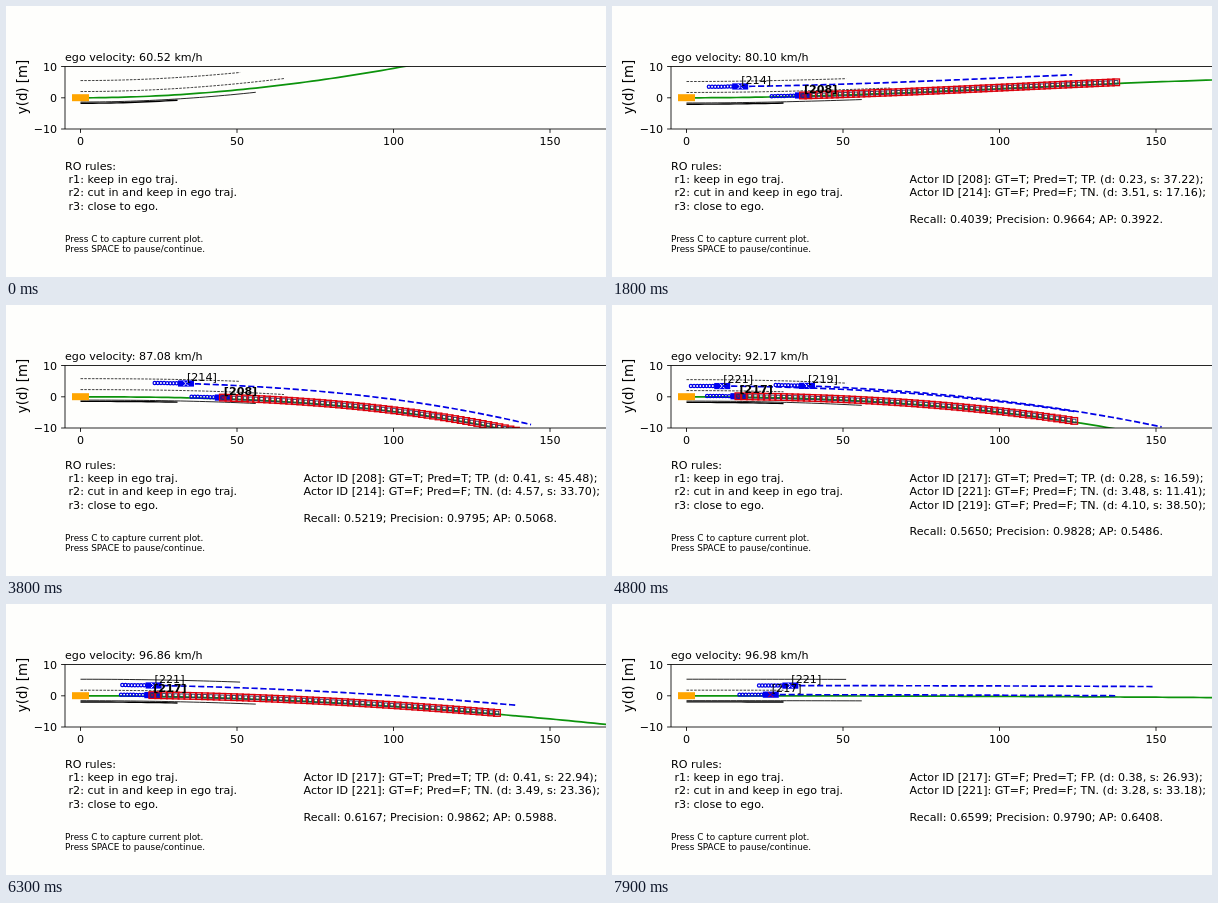
These frames come from a looping animation (600x271 px, 8 s). An HTML page:

```html
<!DOCTYPE html>
<html>
<head>
<meta charset="utf-8">
<style>
  html, body { margin: 0; width: 100%; height: 100%; overflow: hidden; background: #fefefc; }
  svg { display: block; width: 100vw; height: 100vh; }
  text { font: 11.11px "DejaVu Sans", sans-serif; fill: #000; }
  .axis { font-size: 13.33px; }
  .hint { font-size: 8.89px; }
  .bold { font-weight: bold; }
  .line { fill: none; stroke: #000; stroke-width: .85; }
  .thick { stroke-width: 1.4; }
  .dash { stroke-dasharray: 2.6 1.2; stroke-width: .75; }
  .ego { stroke: #0c930c; stroke-width: 1.7; }
  .pred { stroke: #0000e6; stroke-width: 1.67; stroke-dasharray: 6.2 2.7; }
  .trail { fill: none; stroke: #0000e6; stroke-width: 1.25; }
  .box { fill: none; stroke: #dc000c; stroke-width: 1.35; }
  .core { fill: none; stroke: #2c3358; stroke-width: .9; }
</style>
</head>
<body>
<svg viewBox="0 0 600 271">
  <defs><clipPath id="plot"><rect x="59" y="60.5" width="541" height="62.5"/></clipPath></defs>
  <g id="data" clip-path="url(#plot)"></g>
  <g id="axes"></g>
  <g id="labels"></g>
  <text class="axis" text-anchor="middle" transform="translate(20.5 81) rotate(-90)">y(d) [m]</text>
  <text x="59" y="163.5">RO rules:</text>
  <text x="62.5" y="177">r1: keep in ego traj.</text>
  <text x="62.5" y="190.3">r2: cut in and keep in ego traj.</text>
  <text x="62.5" y="203.6">r3: close to ego.</text>
  <text class="hint" x="59" y="236">Press C to capture current plot.</text>
  <text class="hint" x="59" y="246">Press SPACE to pause/continue.</text>
</svg>
<script>
const STEP = 100, STEPS = 80, SWITCH = 48, LOST = 75;
const el = id => document.getElementById(id);
const px = x => 74.5 + x * 3.13;
const py = y => 91.8 - y * 3.13;
const mix = (a, b, u) => a + (b - a) * u;
const range = count => Array.from({ length: count }, (_, i) => i);

// step, speed, road bend and twist, sideways drift of the lanes
const drive = [
  [0, 60.52, 10.6, -1.2, .1],
  [18, 80.10, 4.2, -1.3, -.2],
  [29, 84.15, 7.9, -5.6, .1],
  [38, 87.08, -1.9, -2.8, .4],
  [57, 96.75, -5.2, 0, -.2],
  [70, 96.98, -1.8, .5, 0],
  [79, 96.98, -.2, 0, -.1]
];

// poses: step, s, d
const actors = [
  { id: 208, from: 1, to: SWITCH, hit: true, poses: [[18, 37.22, .23], [29, 43.6, .35], [38, 45.48, .41]] },
  { id: 214, from: 1, to: SWITCH, poses: [[18, 17.16, 3.51], [29, 28.17, 4.4], [38, 33.7, 4.57]] },
  { id: 217, from: SWITCH, to: STEPS, hit: true, poses: [[57, 20.4, .36], [70, 25.91, .47], [79, 26.93, .38]] },
  { id: 221, from: SWITCH, to: STEPS, poses: [[57, 18.58, 3.49], [70, 28.93, 3.5], [79, 33.18, 3.28]] },
  { id: 219, from: SWITCH, to: 62, poses: [[48, 38.5, 4.1], [57, 43.36, 4.07]] }
];

// Linear between keys, and onward along the first and last segment
function at(keys, n) {
  let i = 1;
  while (i < keys.length - 1 && keys[i][0] < n) i++;
  const a = keys[i - 1], b = keys[i], u = (n - a[0]) / (b[0] - a[0]);
  return a.slice(1).map((v, k) => mix(v, b[k + 1], u));
}

function line(f, x0, x1, cls) {
  const count = Math.ceil((x1 - x0) / 2);
  const pts = range(count + 1).map(i => {
    const x = mix(x0, x1, i / count);
    return px(x).toFixed(2) + ',' + py(f(x)).toFixed(2);
  });
  return `<polyline class="line ${cls}" points="${pts.join(' ')}"/>`;
}

const text = (x, y, s, cls = '') => `<text x="${x}" y="${y}" class="${cls}">${s}</text>`;
const square = (x, y, size, cls) =>
  `<rect class="${cls}" x="${x - size / 2}" y="${y - size / 2}" width="${size}" height="${size}"/>`;

function drawActor(a, n, path, speed) {
  const [s, d] = at(a.poses, n), gt = a.hit && n < LOST;
  const end = s + 52 + .6 * speed + (a.hit ? 0 : 6), endOff = a.hit ? .4 : 3.4;
  const f = x => path(x) + mix(d, endOff, (x - s) / (end - s));
  const cx = px(s), cy = py(f(s));
  const trail = range(10).map(i => {
    const x = s - i - 1;
    return `<circle class="trail" cx="${px(x)}" cy="${py(path(x) + d)}" r="1.6"/>`;
  });
  const ahead = gt
    ? range(60).map(i => {
        const x = mix(s, end, i / 59);
        return square(px(x), py(f(x)), 6.6, 'box') + square(px(x), py(f(x)), 3.4, 'core');
      }).join('')
    : line(f, s, end, 'pred');
  const car = `<rect x="${cx - 8}" y="${cy - 3.1}" width="16" height="6.2" fill="#0000f0"/>
    <path d="M${cx - 2.5} ${cy - 2.5}l5 5m0-5l-5 5" stroke="${a.hit ? '#dc000c' : '#fff'}"/>`;
  const verdict = gt ? 'GT=T; Pred=T; TP.' : a.hit ? 'GT=F; Pred=T; FP.' : 'GT=F; Pred=F; TN.';
  return {
    marks: trail.join('') + car + ahead,
    label: text(cx + 1, cy - 2.8, `[${a.id}]`, gt ? 'bold' : ''),
    info: `Actor ID [${a.id}]: ${verdict} (d: ${d.toFixed(2)}, s: ${s.toFixed(2)});`
  };
}

function score(n) {
  const recall = 1 - 1 / (1.305 + .0207 * n);
  const precision = 1 - 1 / (12.7 + .95 * n) - .0024 * Math.max(0, n - LOST);
  const show = v => v.toFixed(4);
  return `Recall: ${show(recall)}; Precision: ${show(precision)}; AP: ${show(.971 * recall)}.`;
}

function draw(n) {
  const [speed, bend, twist, drift] = at(drive, n), later = n >= SWITCH;
  const path = x => bend * 1e-4 * x * x + twist * 1e-6 * x ** 3;
  const lane = (off, end, cls) => line(x => path(x) + off + drift, 0, end, cls);
  const solid = later && n % 22 >= 8;
  const seen = actors.filter(a => n >= a.from && n < a.to).map(a => drawActor(a, n, path, speed));

  el('data').innerHTML = lane(5.4, 51, solid ? '' : 'dash') + lane(1.9, later ? 31 : 65, 'dash')
    + lane(-1.85, 31, 'thick') + lane(-1.45, 56, '')
    + line(path, 0, 172, 'ego')
    + '<rect x="66" y="88.2" width="17" height="7" fill="#ffa500"/>'
    + seen.map(a => a.marks).reverse().join('');

  const rows = seen.map(a => a.info);
  if (rows.length) rows.push('', score(n));
  el('labels').innerHTML = text(59, 55, `ego velocity: ${speed.toFixed(2)} km/h`)
    + seen.map(a => a.label).join('')
    + rows.map((s, i) => text(297.5, 177 + i * 13.25, s)).join('');
}

function drawAxes() {
  let out = '<path class="line" d="M600 60.5H59V123H600"/>';
  for (const v of [0, 50, 100, 150])
    out += `<path class="line" d="M${px(v)} 123v3.9"/><text x="${px(v)}" y="139" text-anchor="middle">${v}</text>`;
  for (const [v, y] of [['10', 60.5], ['0', 91.8], ['\u221210', 123]])
    out += `<path class="line" d="M59 ${y}h-3.9"/><text x="51.2" y="${y + 4.2}" text-anchor="end">${v}</text>`;
  el('axes').innerHTML = out;
}

const start = performance.now();
let shown = -1;
function tick() {
  const n = Math.floor((performance.now() - start) / STEP) % STEPS;
  if (n !== shown) draw(shown = n);
  requestAnimationFrame(tick);
}
drawAxes();
tick();
</script>
</body>
</html>
```
